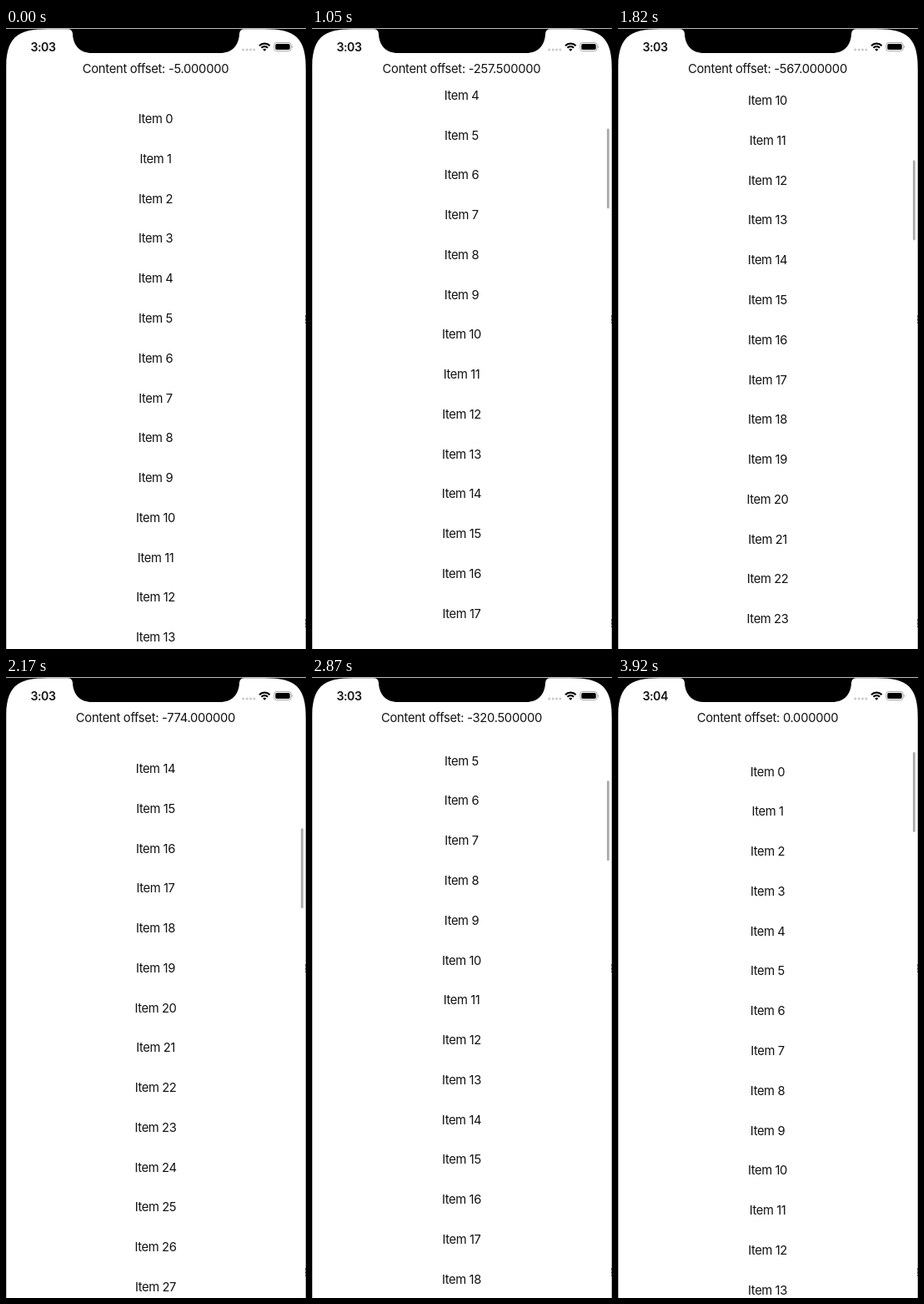
Recreate the animation shown at these times as an HTML page. Size 360x744 px, loop 4.06 s.

```html
<!DOCTYPE html>
<html lang="en">
<head>
<meta charset="utf-8">
<title>Content offset</title>
<style>
  html, body { margin: 0; width: 100%; height: 100%; overflow: hidden; background: #fff; }
  svg { display: block; width: 360px; height: 744px; }
  text { font: 400 14.76px Inter, Roboto, sans-serif; letter-spacing: -.4px; fill: #111; }
  .mid { text-anchor: middle; }
  #label { letter-spacing: -.29px; }
  #clock { font-weight: 600; font-size: 14.1px; }
</style>
</head>
<body>
<svg viewBox="0 0 360 744">
  <rect width="360" height="744" fill="#fff"/>
  <g id="list" class="mid"></g>
  <rect id="bar" x="353.9" width="2.8" rx="1.4" fill="#a9a9a9"/>
  <text id="label" class="mid" x="179.5" y="54.4"></text>

  <!-- bezel and notch -->
  <path d="M0 1H360V51C360 12.300 348.500 1.300 310 1.300H286Q280.500 1.300 280 7C279.500 21 271 30 257 30H103C89 30 80.500 21 80 7Q79.500 1.300 74 1.300H50C11.500 1.300 0 12.300 0 51Z"/>
  <path d="M0 .5H360" stroke="#bbb"/>
  <path d="M.3 40V744M359.700 40V744" stroke="#777" stroke-width=".6"/>
  <path d="M359.500 344V354M359.500 708V718" stroke="#555" stroke-dasharray="3 1"/>

  <!-- status bar -->
  <text id="clock" x="29.400" y="27.900"></text>
  <g fill="#cacaca">
    <circle cx="284.700" cy="26" r="1.500"/><circle cx="289.200" cy="26" r="1.500"/>
    <circle cx="293.500" cy="26" r="1.500"/><circle cx="297.800" cy="26" r="1.500"/>
  </g>
  <g fill="none" stroke="#000" stroke-width="2.100">
    <path d="M304 21.200A8.900 8.900 0 0 1 316.600 21.200"/>
    <path d="M306.500 23.700A5.400 5.400 0 0 1 314.100 23.700"/>
  </g>
  <path d="M310.300 27.800L308.200 25.700A3 3 0 0 1 312.400 25.700Z"/>
  <rect x="321.800" y="17.500" width="20.400" height="10" rx="3" fill="none" stroke="#a6a6a6"/>
  <rect x="323.300" y="19" width="17.400" height="7" rx="1.700"/>
  <path d="M343.300 20.700Q345.300 22.500 343.300 24.300Z" fill="#a6a6a6"/>
</svg>
<script>
const LOOP = 4060, STEP = 70, SCALE = 0.8685, PITCH = 55 * SCALE;
const TOP = 89.3, ROWS = 15;
const $ = id => document.getElementById(id);

// Finger drags as [time, offset] points
const DRAG_A = [[350, -5], [420, -7], [490, -22], [560, -58], [630, -101.3]];
const DRAG_B = [[1540, -332], [1610, -379.5]];
const DRAG_C = [[2450, -856], [2520, -850], [2590, -800], [2660, -693],
                [2730, -555], [2800, -415], [2870, -290]];

function drag(points, t) {
  let i = 1;
  while (i < points.length - 1 && t > points[i][0]) i++;
  const [t0, a] = points[i - 1], [t1, b] = points[i];
  return a + (b - a) * (t - t0) / (t1 - t0);
}

// Decelerating scroll towards `end`, `left` away from it at time t0
const fling = (t, t0, end, left) => end - left * Math.exp((t0 - t) / 500);

// Critically damped return from overscroll
const bounce = s => 772 * s * Math.exp(-10.9 * s);

function offsetAt(t) {
  if (t < 420) return -5;
  if (t < 630) return drag(DRAG_A, t);
  if (t < 1540) return fling(t, 770, -376.5, -208);
  if (t < 1610) return drag(DRAG_B, t);
  if (t <= 2450) return fling(t, 1820, -965.2, -384.9);
  if (t < 2870) return drag(DRAG_C, t);
  if (t < 3150) return fling(t, 3150, 386, 386);
  return bounce((t - 3150) / 1000);
}

// The label trails the list by one refresh while scrolling fast
function labelValue(t) {
  const now = offsetAt(t), before = offsetAt(t - 17);
  const v = Math.abs(now - before) > 9 ? before : now;
  return Math.round(v * 2) / 2 || 0;
}

const rows = Array.from({ length: ROWS }, () => {
  const el = document.createElementNS("http://www.w3.org/2000/svg", "text");
  el.setAttribute("x", 179.5);
  return $("list").appendChild(el);
});

function draw(t) {
  const offset = offsetAt(t), shift = offset * SCALE;
  const first = Math.max(0, Math.floor(-shift / PITCH));
  rows.forEach((el, i) => {
    const n = first + i;
    el.textContent = "Item " + n;
    el.setAttribute("y", (TOP + shift + n * PITCH + 29.2).toFixed(2));
  });
  $("label").textContent = "Content offset: " + labelValue(t).toFixed(6);
  $("clock").textContent = t < 3500 ? "3:03" : "3:04";
  $("bar").setAttribute("y", 90 + Math.max(0, -offset) * 0.118);
  $("bar").setAttribute("height", 96 - Math.max(0, shift));
  $("bar").style.opacity = t < 420 ? 0 : 1;
}

const start = performance.now();
function tick() {
  const t = (performance.now() - start) % LOOP;
  draw(Math.floor(t / STEP) * STEP);
  requestAnimationFrame(tick);
}
tick();
</script>
</body>
</html>
```
